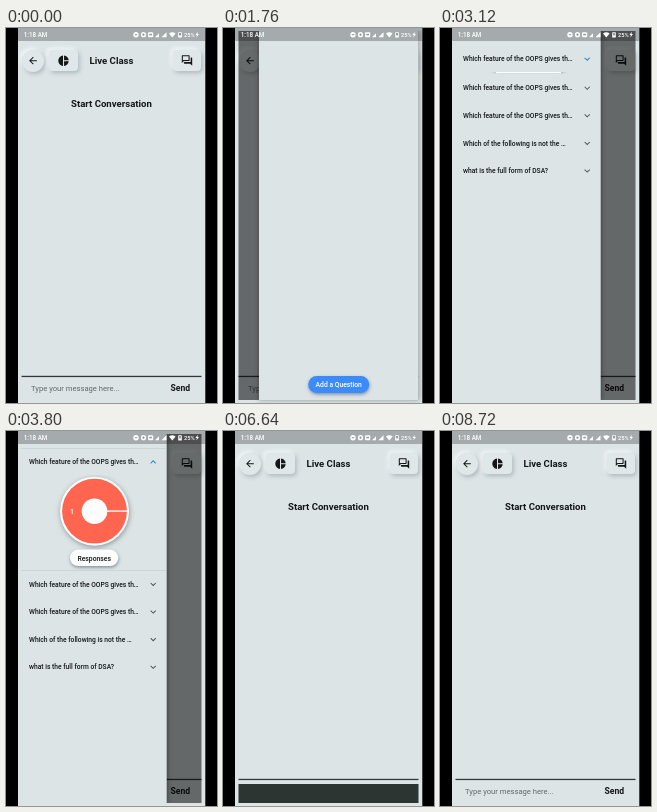
An HTML page with a canvas that plays this animation: 211x375 px, repeating every 9 s.

```html
<!DOCTYPE html>
<html lang="en">
<head>
<meta charset="utf-8">
<title>Live Class</title>
<style>
html, body { margin: 0; width: 100%; height: 100%; overflow: hidden; background: #000; }
canvas { display: block; width: 100vw; height: 100vh; }
</style>
</head>
<body>
<canvas id="stage"></canvas>
<script>
const W = 211, H = 375, LOOP = 9000, STEP = 40;
const canvas = document.getElementById('stage');
const ctx = canvas.getContext('2d');
const BG = '#dce4e6', INK = '#141617';
let scale = 1;

const icons = {
  back: 'M20 11H7.83l5.59-5.59L12 4l-8 8 8 8 1.41-1.41L7.83 13H20v-2z',
  pie: 'M11 2v20c-5.07-.5-9-4.79-9-10s3.93-9.5 9-10zm2.03 0v8.99H22c-.47-4.74-4.24-8.52-8.97-8.99zm0 11.01V22c4.74-.47 8.5-4.25 8.97-8.99h-8.97z',
  chat: 'M15 4v7H5.17L4 12.17V4h11m1-2H3c-.55 0-1 .45-1 1v14l4-4h10c.55 0 1-.45 1-1V3c0-.55-.45-1-1-1zm5 4h-2v9H6v2c0 .55.45 1 1 1h11l4 4V7c0-.55-.45-1-1-1z',
  trash: 'M6 19c0 1.1.9 2 2 2h8c1.1 0 2-.9 2-2V7H6v12zM19 4h-3.5l-1-1h-5l-1 1H5v2h14V4z',
  send: 'M4.01 6.03l7.51 3.22-7.52-1 .01-2.22m7.5 8.72L4 17.97v-2.22l7.51-1M2.01 3L2 10l15 2-15 2 .01 7L23 12 2.01 3z',
  chevron: 'M16.59 8.59L12 13.17 7.41 8.59 6 10l6 6 6-6z',
  bolt: 'M14 2L6 13h5l-2 9 9-12h-5z'
};
for (const k in icons) icons[k] = new Path2D(icons[k]);

const clamp = v => Math.max(0, Math.min(1, v));
const ramp = (t, from, to) => clamp((t - from) / (to - from));

function icon(name, x, y, size, color = INK, turn = 0) {
  ctx.save();
  ctx.translate(x, y);
  ctx.rotate(turn);
  ctx.scale(size / 24, size / 24);
  ctx.translate(-12, -12);
  ctx.fillStyle = color;
  ctx.fill(icons[name], 'evenodd');
  ctx.restore();
}

function text(str, x, y, size, weight = 500, color = INK, align = 'left') {
  ctx.font = `${weight} ${size}px Roboto, sans-serif`;
  ctx.textAlign = align;
  ctx.fillStyle = color;
  ctx.fillText(str, x, y);
}

function rect(x, y, w, h, color) {
  ctx.fillStyle = color;
  ctx.fillRect(x, y, w, h);
}

function rounded(x, y, w, h, r, color) {
  ctx.beginPath();
  ctx.roundRect(x, y, w, h, r);
  ctx.fillStyle = color;
  ctx.fill();
}

function disc(x, y, r, color) {
  ctx.beginPath();
  ctx.arc(x, y, r, 0, Math.PI * 2);
  ctx.fillStyle = color;
  ctx.fill();
}

function shadowed(color, dx, dy, blur, draw) {
  ctx.save();
  ctx.shadowColor = color;
  ctx.shadowOffsetX = dx * scale;
  ctx.shadowOffsetY = dy * scale;
  ctx.shadowBlur = blur * scale;
  draw();
  ctx.restore();
}

function clipped(x, y, w, h, draw) {
  ctx.save();
  ctx.beginPath();
  ctx.rect(x, y, w, h);
  ctx.clip();
  draw();
  ctx.restore();
}

function soft(x, y, w, h, r) {
  const face = () => rounded(x, y, w, h, r, '#e0e7e9');
  shadowed('rgba(255,255,255,.75)', -2, -2, 4, face);
  shadowed('rgba(110,125,130,.42)', 1.5, 2, 4.5, face);
}

function home() {
  soft(16, 22, 22, 22, 11);
  icon('back', 27, 32.7, 11.5);
  soft(43, 22, 29, 21, 4);
  icon('pie', 57.5, 32.7, 12.5);
  soft(167, 22, 28, 21, 4);
  icon('chat', 181, 32.5, 12.5);
  text('Live Class', 83.5, 36, 9.6, 700);
  text('Start Conversation', 65, 79, 9.6, 700);
  rect(15.5, 347.8, 180, 1.3, '#34393a');
  text('Type your message here...', 25, 362.8, 7.65, 400, '#62696b');
  text('Send', 164.5, 363.4, 8.6, 700);
}

function statusBar() {
  const c = '#fff';
  rect(12, 0, 188, 13, 'rgba(0,0,0,.25)');
  text('1:18 AM', 17.7, 9, 6.3, 500, c);
  disc(130, 6.7, 2.7, c);
  rect(128.8, 6.2, 2.4, 1, '#8d9293');
  disc(137.5, 6.7, 2.6, c);
  disc(137.5, 6.7, 1.1, '#8d9293');
  rounded(142, 4.3, 5.2, 5, 1, c);
  rect(143.2, 5.8, 2.8, 1.5, '#969b9c');
  ctx.fillStyle = c;
  for (const [x, w] of [[149, 4], [155.5, 5]]) {
    ctx.beginPath();
    ctx.moveTo(x, 9.3);
    ctx.lineTo(x + w, 9.3);
    ctx.lineTo(x + w, 9.3 - w);
    ctx.fill();
  }
  ctx.beginPath();
  ctx.moveTo(166.3, 9.6);
  ctx.lineTo(163, 5.6);
  ctx.quadraticCurveTo(166.3, 2.7, 169.6, 5.6);
  ctx.fill();
  rounded(172.2, 4.2, 3.6, 5.3, .6, c);
  rect(173, 5, 2, 2.4, '#969b9c');
  text('25%', 178, 9, 5.7, 500, c);
  icon('bolt', 191.2, 6.7, 7, c);
}

function scrim(p) {
  rect(15.5, 3, 180, 369, `rgba(0,0,0,${.54 * p})`);
}

function pill(x, y, w, h, color, shade) {
  shadowed(shade, .4, 1.5, 3.5, () => rounded(x, y, w, h, h / 2, color));
}

function questionCard() {
  shadowed('rgba(70,85,90,.5)', .5, 1.5, 4, () => rounded(41.5, 23, 149, 65.5, 6, '#fafcfc'));
  text('Which feature of the OOPS gives', 53.2, 39.2, 6.65);
  text('the concept of reusability?', 53.2, 46.9, 6.65);
  icon('chevron', 172.3, 40.5, 12, '#6d7374');
  const buttons = [[50.8, '#ff6452', 'trash', 71.5, 'Delete', 77, '#702820'],
                   [119.4, '#43a04c', 'send', 140.6, 'Send', 149.6, '#122c15']];
  for (const [x, fill, glyph, gx, label, lx, ink] of buttons) {
    shadowed('rgba(0,0,0,.3)', 0, .7, 1.5, () => rounded(x, 61, 61.2, 17.4, 1, fill));
    icon(glyph, gx, 69.6, 10.5, ink);
    text(label, lx, 72.1, 6.8, 500, ink);
  }
}

function rightDrawer(p, hasCard) {
  scrim(p);
  clipped(15.5, 3, 184, 372, () => {
    ctx.translate(164 * (1 - p), 0);
    shadowed('rgba(0,0,0,.35)', 0, 0, 5, () => rect(36, 3, 159.6, 369, BG));
    if (hasCard) questionCard();
    pill(85.2, 348, 61, 17, '#3d8bfb', 'rgba(30,60,100,.5)');
    text('Add a Question', 115.7, 358.8, 6.75, 500, '#fff', 'center');
  });
}

function chart(loaded) {
  const x = 88.5, y = 80.2;
  shadowed('rgba(60,75,80,.5)', .5, 1.5, 5, () => disc(x, y, 34.5, '#fcfdfd'));
  if (loaded) {
    disc(x, y, 32.4, '#ff654f');
    disc(x, y, 12.8, '#fcfdfd');
    rect(x + 12, y - .8, 20.5, 1.4, '#f8fafa');
    text('1', 66, 82.8, 7, 500, '#fff', 'center');
  }
  pill(64, 118.5, 48.3, 16.6, '#fcfdfd', 'rgba(60,75,80,.55)');
  text('Responses', 88.2, 129.5, 6.8, 500, INK, 'center');
}

function leftDrawer(p, t) {
  const open = ramp(t, 3080, 3400) ** 2;
  const full = 94.7, grow = full * open;
  const repeated = 'Which feature of the OOPS gives th…';
  const rows = [repeated, repeated, repeated,
                'Which of the following is not the …', 'what is the full form of DSA?'];
  scrim(p);
  clipped(12, 3, 183.6, 369, () => {
    ctx.translate(-150 * (1 - p), 0);
    shadowed('rgba(0,0,0,.45)', 0, 0, 5, () => rect(12, 3, 148.7, 369, BG));
    rows.forEach((label, i) => {
      const y = 31 + 27.6 * i + (i ? grow : 0);
      text(label, 23, y + 2.3, 6.7);
      icon('chevron', 147.2, y, 11.5, i || !open ? '#4b5152' : '#2787d8', i ? 0 : -Math.PI * open);
    });
    if (open) {
      const line = `rgba(0,0,0,${.14 * open})`;
      rect(15, 17, 145, .5, line);
      rect(15, 44.4 + grow, 145, .5, line);
      clipped(12, 44, 148, grow, () => {
        ctx.translate(0, (grow - full) / 2);
        chart(t >= 3800);
      });
    }
  });
}

function snackbar(t) {
  const top = 353 - 3 * ramp(t, 6640, 6720);
  ctx.globalAlpha = 1 - ramp(t, 8480, 8720);
  rect(15.5, top, 180, 372 - top, '#2d3533');
  ctx.globalAlpha = 1;
}

function draw(time) {
  const t = Math.floor((time % LOOP) / STEP) * STEP;
  scale = canvas.width / W;
  ctx.setTransform(scale, 0, 0, canvas.height / H, 0, 0);
  rect(0, 0, W, H, '#000');
  clipped(12, 0, 187.3, H, () => {
    rect(12, 0, 188, H, BG);
    home();
    if (t >= 920 && t < 2080) {
      const p = t < 1760 ? 1 - (1 - ramp(t, 880, 1280)) ** 5.2 : (1 - ramp(t, 1760, 2080)) ** 3;
      rightDrawer(p, t < 1760);
    } else if (t >= 2480 && t < 5240) {
      leftDrawer(t < 2600 ? .75 : t < 5160 ? 1 : .5, t);
    } else if (t >= 6640 && t < 8720) {
      snackbar(t);
    }
    statusBar();
  });
}

function resize() {
  const dpr = window.devicePixelRatio || 1;
  canvas.width = Math.round(innerWidth * dpr);
  canvas.height = Math.round(innerHeight * dpr);
}

resize();
addEventListener('resize', resize);
const start = performance.now();
function tick() {
  draw(performance.now() - start);
  requestAnimationFrame(tick);
}
tick();
</script>
</body>
</html>
```
